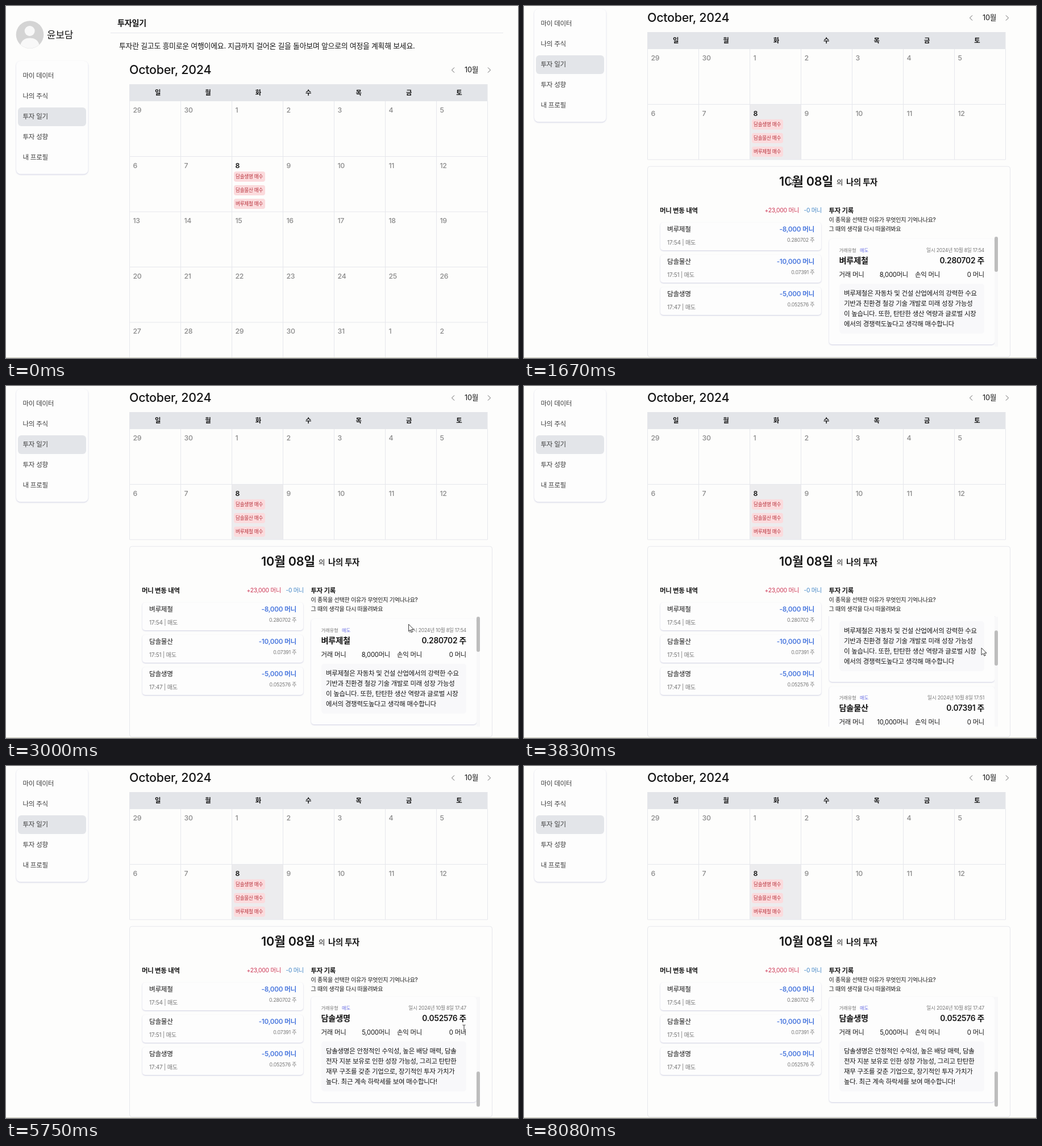
An HTML page that plays this animation: 901x621 px, repeating every 8.12 s.

```html
<!DOCTYPE html>
<html lang="ko">
<head>
<meta charset="utf-8">
<title>투자일기</title>
<style>
html, body { margin: 0; width: 100%; height: 100%; overflow: hidden; background: #fdfdfc; }
svg { display: block; font-family: Inter, "Noto Sans CJK KR", "Noto Sans CJK", sans-serif; letter-spacing: -.015em; }
.card { fill: #fdfdfd; filter: drop-shadow(0 1.2px .9px rgba(70, 75, 150, .26)); }
.line { fill: none; stroke: #e6e7ec; }
</style>
</head>
<body>
<svg id="stage" width="901" height="621" viewBox="0 0 901 621"></svg>
<script>
const LOOP = 8120, PAGE_SCROLL = 92, LOG_MAX = 410, CLICK = 1250;
const INK = '#151515', GRAY = '#777', BLUE = '#4a78de', VIOLET = '#6c70e4';

const text = (s, x, y, size, { fill = INK, bold, anchor = 'start' } = {}) =>
  `<text x="${x}" y="${y}" font-size="${size}" fill="${fill}" font-weight="${bold ? 600 : 400}" text-anchor="${anchor}">${s}</text>`;
const right = (s, x, y, size, opt) => text(s, x, y, size, { ...opt, anchor: 'end' });
const rect = (x, y, w, h, r, attr) => `<rect x="${x}" y="${y}" width="${w}" height="${h}" rx="${r}" ${attr}/>`;
const path = (d, attr = 'class="line"') => `<path d="${d}" ${attr}/>`;
const each = (list, fn) => list.map(fn).join('');
const range = n => [...Array(n).keys()];

const trades = [
  { name: '벼루제철', time: '17:54', money: '8,000', shares: '0.280702', top: 0, note: [
    '벼루제철은 자동차 및 건설 산업에서의 강력한 수요',
    '기반과 친환경 철강 기술 개발로 미래 성장 가능성',
    '이 높습니다. 또한, 탄탄한 생산 역량과 글로벌 시장',
    '에서의 경쟁력도높다고 생각해 매수합니다'] },
  { name: '담솔물산', time: '17:51', money: '10,000', shares: '0.07391', top: 194, note: [
    '담솔물산은 다양한 사업 포트폴리오와 담솔전자 지',
    '분 보유로 인한 성장 잠재력, 그리고 건설 부문의 글',
    '로벌 경쟁력을 갖추고 있어 장기적인 투자 가치가',
    '높습니다. 또한, 친환경 사업 확장과 탄탄한 재무 구',
    '조도 매수 이유로 작용합니다.'] },
  { name: '담솔생명', time: '17:47', money: '5,000', shares: '0.052576', top: 406, note: [
    '담솔생명은 안정적인 수익성, 높은 배당 매력, 담솔',
    '전자 지분 보유로 인한 성장 가능성, 그리고 탄탄한',
    '재무 구조를 갖춘 기업으로, 장기적인 투자 가치가',
    '높다. 최근 계속 하락세를 보여 매수합니다!'] },
];

const sidebar = () =>
  '<circle cx="42" cy="50.5" r="24.3" fill="#d4d4d4"/><circle cx="41.7" cy="44" r="9" fill="#f8f8f8"/>' +
  path('M25.5 68.3C28 59 35 56.5 42 56.5S56 59 58.5 68.3A24.3 24.3 0 0 1 25.5 68.3Z', 'fill="#f8f8f8"') +
  text('윤보담', 72, 57, 17) +
  rect(18, 97, 126.5, 199.5, 8, 'class="card"') +
  rect(21, 179, 120, 33, 6, 'fill="#e3e5e9"') +
  each(['마이 데이터', '나의 주식', '투자 일기', '투자 성향', '내 프로필'],
    (s, i) => text(s, 29.5, 127 + 36 * i, 11.5, { fill: '#3c3c3c' }));

const heading = () =>
  text('투자일기', 196, 35, 14.1, { bold: 1 }) + path('M184 47.5H875') +
  text('투자란 길고도 흥미로운 여행이에요. 지금까지 걸어온 길을 돌아보며 앞으로의 여정을 계획해 보세요.', 199, 75, 12.9) +
  text('<tspan font-weight="500">October, 2024</tspan>', 217, 120, 21.4) +
  path('M789 108.5l-4.5 4.5 4.5 4.5M848 108.5l4.5 4.5-4.5 4.5', 'fill="none" stroke="#666"') +
  text('10월', 807, 117, 12.7);

const week = row => {
  const y = 168 + 97.5 * row;
  return path(`M217.5 ${y + 97.5}H847.5` + each(range(8), i => `M${217.5 + 90 * i} ${y}v97.5`)) +
    each(range(7), i => {
      const n = row * 7 + i + 28, day = n < 30 ? n + 1 : (n - 30) % 31 + 1, today = n === 37;
      return text(`<tspan font-weight="${today ? 600 : 500}">${day}</tspan>`, 223.5 + 90 * i, y + 20, 12.3,
        { fill: today ? INK : '#898989' });
    });
};

const calendar = () =>
  rect(217, 138, 630.5, 30, 0, 'fill="#e3e5e9"') +
  each([...'일월화수목금토'], (s, i) => text(s, 267 + 88.4 * i, 156.8, 11.3, { bold: 1, anchor: 'middle' })) +
  rect(398, 266, 89, 97, 0, 'id="picked" fill="#ececee"') +
  week(0) + week(1) + `<g id="later">${week(2) + week(3) + week(4)}</g>` +
  each([...trades].reverse(), (t, i) =>
    rect(401, 292 + 24 * i, 55, 18, 4, 'fill="#fbdbdd"') +
    text(t.name + ' 매수', 404, 304.2 + 24 * i, 8.6, { fill: '#b8323c' }));

const moneyCard = (t, i) => `<g transform="translate(0 ${57 * i})">` +
  rect(240, 382, 283, 49, 5, 'class="card"') +
  text(t.name, 252, 398.2, 11.6) +
  text(t.time + ' | 매도', 252, 420.7, 10.1, { fill: GRAY }) +
  right(`-${t.money} 머니`, 511, 398.2, 11.7, { fill: BLUE, bold: 1 }) +
  right(t.shares + ' 주', 511, 415.5, 8.8, { fill: GRAY }) + '</g>';

const logCard = t => `<g transform="translate(0 ${t.top})">` +
  rect(537, 411, 291, 114 + 18 * t.note.length, 5, 'class="card"') +
  text('거래유형', 554.5, 433.5, 8.4, { fill: GRAY }) +
  text('매도', 591, 433.5, 8.4, { fill: VIOLET }) +
  right(`일시 2024년 10월 8일 ${t.time}`, 810, 433.5, 8.7, { fill: GRAY }) +
  text(t.name, 554.5, 453.7, 14.2, { bold: 1 }) +
  right(t.shares + ' 주', 810, 453.7, 13.8, { bold: 1 }) +
  text('거래 머니', 554.5, 477.7, 11.4) + right(t.money + '머니', 676, 477.7, 11.3) +
  text('손익 머니', 688, 477.7, 11.4) + right('0 머니', 810, 477.7, 11.3) +
  rect(555, 490, 255, 16 + 18 * t.note.length, 5, 'fill="#f8f8fa"') +
  each(t.note, (s, i) => text(s, 563, 510.7 + 18 * i, 11.45)) + '</g>';

const panel = () => `<g id="panel" transform="translate(0 ${PAGE_SCROLL})">` +
  rect(217.5, 283, 638, 336, 4, 'class="line"') +
  text('10월 08일', 449, 316.5, 21.6, { bold: 1 }) + text('의', 550, 316, 12.4) +
  text('나의 투자', 567, 316, 14.3, { bold: 1 }) +
  text('머니 변동 내역', 239, 365, 11.4, { bold: 1 }) +
  right('+23,000 머니', 484, 364, 10.3, { fill: '#cc3352' }) +
  right('-0 머니', 524, 364, 10.2, { fill: '#3f84c6' }) +
  each(trades, moneyCard) +
  text('투자 기록', 536.5, 365, 11.4, { bold: 1 }) +
  text('이 종목을 선택한 이유가 무엇인지 기억나나요?', 536.5, 381.3, 10) +
  text('그 때의 생각을 다시 떠올려봐요', 536.5, 396.5, 10) +
  `<g clip-path="url(#logView)"><g id="log">${each(trades, logCard)}</g></g>` +
  rect(828, 407, 6, 194, 0, 'fill="#f8f8f9"') +
  rect(828, 407, 6, 62, 3, 'id="thumb" fill="#bdbdbd"') + '</g>';

const cursors = {
  arrow: path('M0 0V12.5L3 9.8L5 14.2L7 13.3L5.1 9.2H9Z', 'fill="#fff" stroke="#222" stroke-width=".9"'),
  beam: path('M-2.5-6H-.8L0-5.3L.8-6H2.5M0-5.3V5.3M-2.5 6H-.8L0 5.3L.8 6H2.5', 'fill="none" stroke="#333"'),
  hand: path('M-1.5 10V1.3a1.4 1.4 0 0 1 2.8 0V7l.3-1.2a1.3 1.3 0 0 1 2.6.4a1.3 1.3 0 0 1 2.5.5a1.2 1.2 0 0 1 2.2.8V13q0 2-1.5 5H.5Q-1 14.5-4.5 11.5a1.3 1.3 0 0 1 1.9-1.8Z',
    'fill="#fff" stroke="#222"'),
};

const $ = id => document.getElementById(id);
$('stage').innerHTML =
  '<clipPath id="logView"><rect x="530" y="406" width="306" height="195"/></clipPath>' +
  `<g id="page">${sidebar() + heading() + calendar() + panel()}</g>` +
  path('M0 620.5H901', 'stroke="#cacab8"') +
  '<g id="cursor">' + each(Object.entries(cursors), ([k, d]) => `<g id="${k}">${d}</g>`) + '</g>';

const smooth = v => { v = Math.max(0, Math.min(1, v)); return v * v * (3 - 2 * v); };
const move = (id, x, y) => $(id).setAttribute('transform', `translate(${x} ${y})`);
const show = (id, on) => $(id).style.display = on ? '' : 'none';

// time, x, y
const route = [[200, 915, 600], [900, 467, 302], [1700, 467, 302], [2150, 472, 318], [2550, 472, 318],
  [3250, 805, 462], [5300, 805, 462], [5500, 806, 463], [6500, 806, 463], [7200, 905, -20]];
// time, distance
const wheel = [[3500, 75], [3980, 75], [4260, 75], [4680, 75], [4920, 75], [5140, 35]];

const pointerAt = t => {
  const i = route.findIndex(k => k[0] > t);
  if (i < 1) return null;
  const [t0, x0, y0] = route[i - 1], [t1, x1, y1] = route[i], p = smooth((t - t0) / (t1 - t0));
  return [x0 + (x1 - x0) * p, y0 + (y1 - y0) * p];
};
const pointerKind = t =>
  t > 500 && t < 1600 ? 'hand' : t > 1900 && t < 2700 || t > 5250 && t < 6600 ? 'beam' : 'arrow';

function draw(now) {
  const t = now % LOOP, open = t >= CLICK;
  move('page', 0, -PAGE_SCROLL * smooth((t - 1330) / 320));
  show('picked', open);
  show('panel', open);
  show('later', !open);

  const offset = wheel.reduce((sum, [t0, d]) => sum + d * smooth((t - t0) / 160), 0);
  move('log', 0, -offset);
  move('thumb', 0, offset / LOG_MAX * 132);

  const at = pointerAt(t), kind = pointerKind(t);
  show('cursor', at);
  if (at) move('cursor', ...at);
  Object.keys(cursors).forEach(k => show(k, k === kind));
}

const start = performance.now();
(function tick() {
  draw(performance.now() - start);
  requestAnimationFrame(tick);
})();
</script>
</body>
</html>
```
